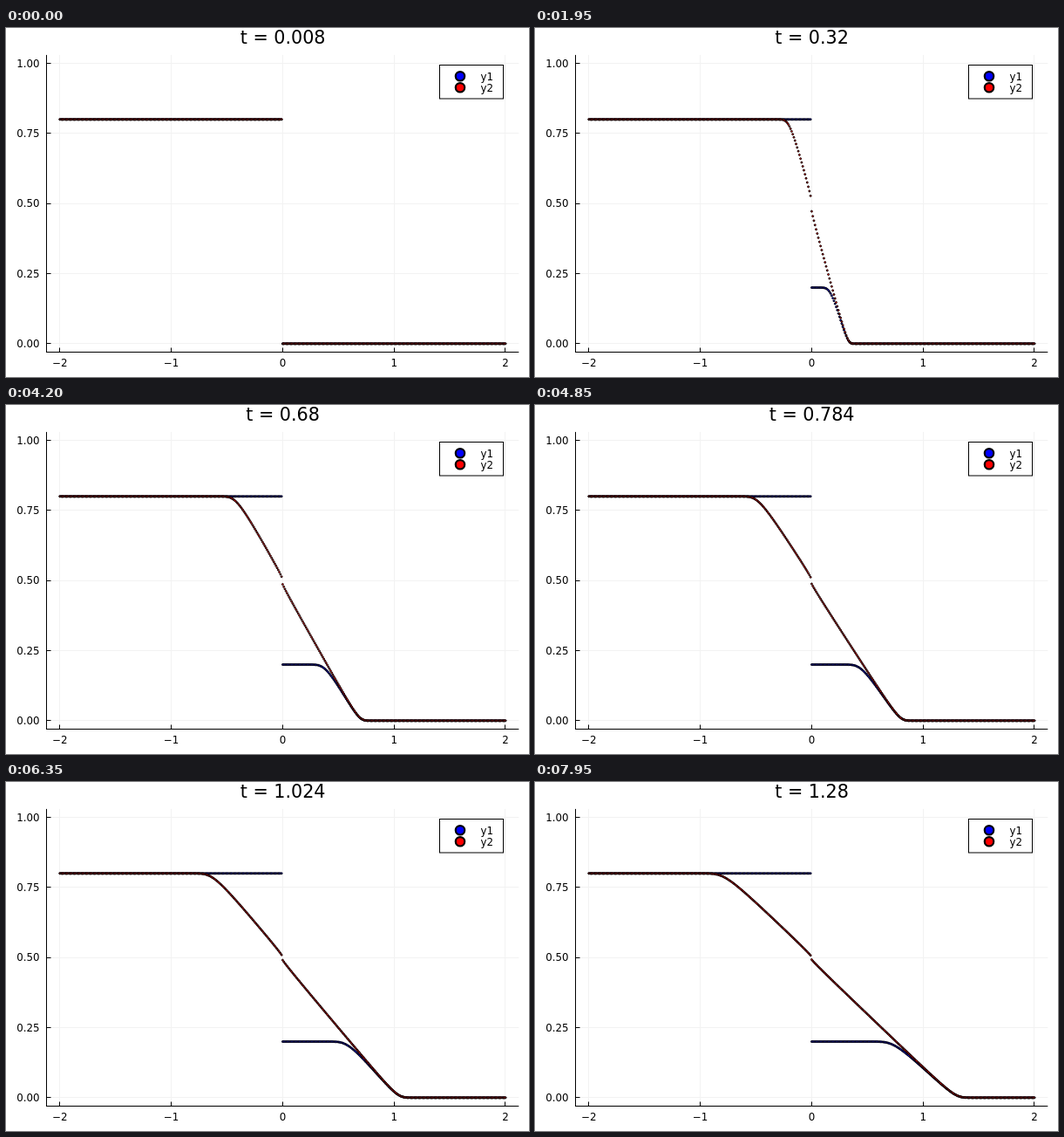
Write an HTML page with a canvas that moves like this. It is 600 by 400 pixels and loops after 8 s.

```html
<!DOCTYPE html>
<html>
<head>
<meta charset="utf-8">
<style>
  html, body { margin: 0; width: 100%; height: 100%; overflow: hidden; background: #fff; }
  canvas { display: block; }
</style>
</head>
<body>
<canvas id="plot" width="600" height="400"></canvas>
<script>
const ctx = document.getElementById('plot').getContext('2d');
const STEP_MS = 50, STEPS = 160, DX = 0.01, DT = 0.008, CELLS = 401;
const LEFT = 46.5, RIGHT = 588.3, TOP = 30.9, BOTTOM = 371.5;
const px = x => 317.4 + 127.75 * x;
const py = u => 361.8 - 321.3 * u;

// Traffic flow u_t + (u(1-u))_x = 0, solved with two upwind fluxes.
const flow = u => u * (1 - u);
const roe = (a, b) => flow(a + b < 1 ? a : b);
function godunov(a, b) {
  if (a <= b) return Math.min(flow(a), flow(b));
  return a > 0.5 && b < 0.5 ? 0.25 : Math.max(flow(a), flow(b));
}

function solve(flux) {
  let u = Array.from({ length: CELLS }, (_, i) => i < 200 ? 0.8 : 0);
  const states = [u];
  while (states.length < STEPS) {
    const prev = u;
    u = prev.map((v, i) => i === 0 || i === CELLS - 1 ? v
      : v - DT / DX * (flux(v, prev[i + 1]) - flux(prev[i - 1], v)));
    states.push(u);
  }
  return states;
}

const series = [
  { name: 'y1', color: '#00f', states: solve(roe) },
  { name: 'y2', color: '#f00', states: solve(godunov) }
];

function line(x1, y1, x2, y2, color = '#000', width = 1) {
  ctx.strokeStyle = color;
  ctx.lineWidth = width;
  ctx.beginPath();
  ctx.moveTo(x1, y1);
  ctx.lineTo(x2, y2);
  ctx.stroke();
}

function text(str, x, y, align, size = 11.8) {
  ctx.font = size + 'px "DejaVu Sans", sans-serif';
  ctx.textAlign = align;
  ctx.fillStyle = '#000';
  ctx.fillText(str, x, y);
}

function marker(x, y, r, color, border) {
  ctx.beginPath();
  ctx.arc(x, y, r, 0, 2 * Math.PI);
  ctx.fillStyle = color;
  ctx.fill();
  ctx.strokeStyle = '#000';
  ctx.lineWidth = border;
  ctx.stroke();
}

function drawAxes() {
  const xTicks = [-2, -1, 0, 1, 2], yTicks = [0, 0.25, 0.5, 0.75, 1];
  const snap = v => Math.floor(v) + 0.5;
  for (const x of xTicks) line(snap(px(x)), TOP, snap(px(x)), BOTTOM, '#f2f2f2');
  for (const y of yTicks) line(LEFT, snap(py(y)), RIGHT, snap(py(y)), '#f2f2f2');
  line(LEFT, TOP, LEFT, BOTTOM + 0.5);
  line(LEFT, BOTTOM, RIGHT, BOTTOM);
  for (const x of xTicks) {
    line(snap(px(x)), BOTTOM, snap(px(x)), BOTTOM - 5);
    text(String(x).replace('-', '\u2212'), px(x), 387.5, 'center');
  }
  for (const y of yTicks) {
    line(LEFT, snap(py(y)), LEFT + 5, snap(py(y)));
    text(y.toFixed(2), 38.5, py(y) + 4.3, 'right');
  }
}

function drawLegend() {
  ctx.fillStyle = '#fff';
  ctx.fillRect(497, 42, 73, 39);
  ctx.strokeStyle = '#000';
  ctx.lineWidth = 1;
  ctx.strokeRect(497.5, 42.5, 73, 38.5);
  series.forEach((s, i) => {
    const y = 55.3 + 13 * i;
    marker(521, y, 5.2, s.color, 2.2);
    text(s.name, 544.5, y + 4.3, 'left');
  });
}

function draw(step) {
  ctx.fillStyle = '#fff';
  ctx.fillRect(0, 0, 600, 400);
  drawAxes();
  for (const s of series) {
    s.states[step].forEach((u, i) => marker(px(-2 + i * DX), py(u), 1, s.color, 1));
  }
  drawLegend();
  const t = Number(((step + 1) * DT).toFixed(3));
  text('t = ' + (Number.isInteger(t) ? t.toFixed(1) : t), 317.6, 17.9, 'center', 20.7);
}

let shown = -1;
function tick() {
  const step = Math.floor(performance.now() / STEP_MS) % STEPS;
  if (step !== shown) draw(shown = step);
  requestAnimationFrame(tick);
}
tick();
</script>
</body>
</html>
```
